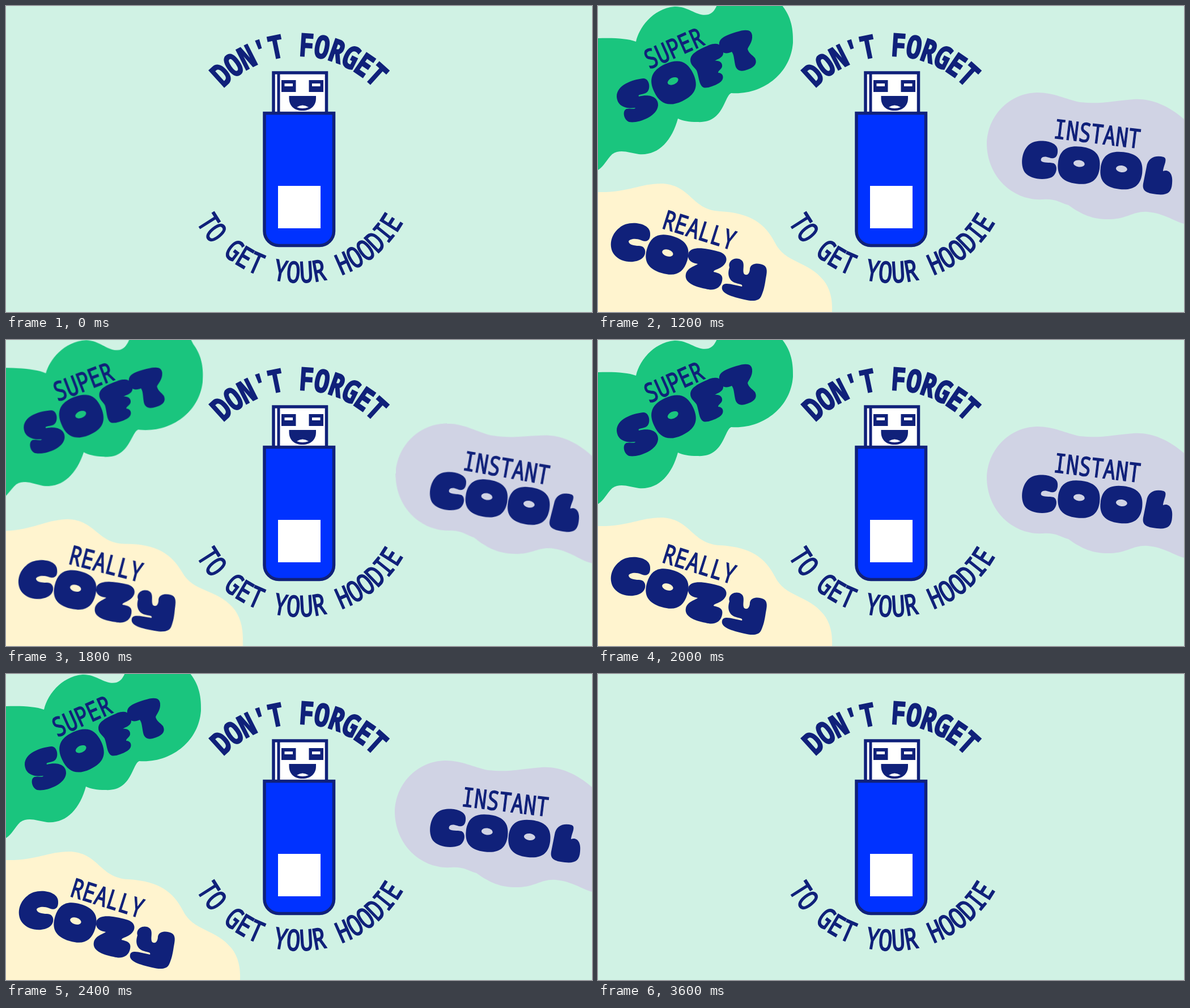
Animation, 1034 px wide and 541 px high, one loop 5.6 s. Source, as an HTML page:

```html
<!DOCTYPE html>
<html lang="en">
<head>
<meta charset="utf-8">
<title>Don't forget to get your hoodie</title>
<style>
  html, body { margin: 0; width: 100%; height: 100%; overflow: hidden; background: #d0f2e4; }
  svg { display: block; width: 100%; height: 100%; }
  text {
    font-family: "Noto Sans Mono", "DejaVu Sans Mono", monospace;
    text-anchor: middle;
    stroke: #10217a;
    vector-effect: non-scaling-stroke;
  }
  .ink, text { fill: #10217a; }
  .line { stroke: #10217a; stroke-width: 5.5; }
</style>
</head>
<body>
<svg viewBox="0 0 1034 541">
  <g id="stickers">
    <g class="sticker" data-pivot="150 125">
      <path fill="#1ac57e" d="M-60 60L0 57C25 56 52 57 67 63C72 40 95 5 135 1C160 0 175 20 195 15C203 12 207 6 210-2L240-60H290L324-2C338 15 345 35 344 65C340 120 290 158 235 154C222 160 222 208 175 205C160 205 150 203 141 199C130 240 105 265 72 262C55 260 40 252 25 262C15 272 10 284 0 290L-60 320Z"/>
      <g class="ink" role="img" aria-label="SOFT">
        <path d="M33 160C33 140 60 130 80 128C92 128 94 150 84 154C76 157 70 156 72 160C90 155 107 160 106 176C104 196 70 208 55 205C46 202 42 186 50 182C56 180 64 184 66 180C50 182 34 178 33 160Z"/>
        <path d="M163 96C163 84 176 78 196 69C214 62 222 72 221 84C220 92 210 94 206 97C214 96 220 100 219 107C218 112 212 114 212 118C222 118 224 130 214 136C204 142 192 146 186 144C178 140 178 124 174 114C170 108 163 104 163 96Z"/>
        <path d="M214 70C212 58 222 53 244 46C262 40 271 42 272 52C273 64 266 70 264 76C266 84 272 86 277 92C283 104 272 110 262 113C252 117 244 114 242 104C240 94 240 86 236 81C226 86 216 84 214 70Z"/>
      </g>
    </g>
    <g class="sticker" data-pivot="165 440">
      <path fill="#fff4cf" d="M-60 329H0C55 330 75 313 115 314C165 318 165 360 215 363C270 366 295 385 312 418C330 455 370 450 398 485C410 500 414 520 413 541L410 600H-60Z"/>
      <g class="ink" role="img" aria-label="COZY">
        <path d="M38 392C52 378 92 382 92 402C93 416 84 418 76 414C66 410 56 412 54 416C54 422 64 424 72 424C86 424 86 440 78 446C66 456 40 454 29 440C18 426 22 404 38 392Z"/>
        <path d="M160 436C166 424 190 428 212 434C228 438 230 450 222 458C214 466 204 466 204 470C212 472 222 474 219 486C216 500 204 504 190 500C168 496 152 488 155 474C158 462 172 460 176 456C164 454 156 448 160 436Z"/>
        <path d="M232 462C228 448 246 442 254 450C260 456 254 468 258 474C264 478 268 472 268 464C270 454 284 454 292 458C300 462 298 472 296 482C294 496 292 504 288 513C284 523 270 522 258 519C236 514 216 508 219 496C222 486 240 494 254 496C256 492 250 492 244 490C230 486 228 474 232 462Z"/>
      </g>
    </g>
    <g class="sticker" data-pivot="880 270">
      <path fill="#d0d3e4" d="M1100 235L1034 200C1005 175 975 163 945 165C905 168 890 174 850 170C825 165 805 153 775 153C725 154 686 195 686 246C688 305 735 345 785 342C805 340 815 347 830 352C855 370 875 378 905 377C935 376 945 362 970 364C1000 367 1015 380 1034 385L1100 400Z"/>
      <g class="ink" role="img" aria-label="COOL">
        <path d="M762 244C776 234 810 238 811 254C812 266 806 272 796 268C786 264 780 268 782 274C786 278 796 276 804 278C812 282 810 298 800 303C786 309 762 306 753 294C744 280 748 254 762 244Z"/>
        <path d="M968 284C970 268 984 263 998 267C1006 270 998 282 997 292C1008 288 1015 298 1013 314C1012 330 1004 335 986 333C966 331 960 326 962 314Z"/>
      </g>
    </g>
  </g>

  <g id="stick">
    <rect class="line" x="472" y="118" width="93.5" height="74" fill="#fff"/>
    <path class="line" d="M481 118V190" style="stroke-width:5"/>
    <path class="ink" fill-rule="evenodd" d="M486 131H511.500V152H486ZM491.500 137V142H506V137ZM534.500 131H560V152H534.500ZM540 137V142H554.500V137Z"/>
    <path class="ink" d="M499.500 159H547V163C547 177 537 185 523 185C509 185 499.500 177 499.500 163Z"/>
    <path fill="#fff" d="M513 179Q523 172 534 179Q523 183 513 179Z"/>
    <path class="line" fill="#0032ff" d="M456 189.500H578.500V398A25.500 25.500 0 0 1 553 423.500H481.500A25.500 25.500 0 0 1 456 398Z"/>
    <rect x="480" y="318" width="75" height="75" fill="#fff"/>
  </g>
</svg>
<script>
const LOOP = 5600;
const NARROW = 0.78;
const CAP = 0.714;
// The outline thickens the installed weights to the in-between ones needed here.
const HEAVY = { 'font-size': 55, 'font-weight': 700, 'stroke-width': 2.2 };
const MEDIUM = { 'font-size': 51, 'font-weight': 400, 'stroke-width': 1.8 };
const SMALL = { 'font-size': 47, 'font-weight': 400, 'stroke-width': 1.3 };
const svg = document.querySelector('svg');
const stickers = [...document.querySelectorAll('.sticker')];

function add(parent, tag, attrs, content = '') {
  const node = document.createElementNS('http://www.w3.org/2000/svg', tag);
  for (const key in attrs) node.setAttribute(key, attrs[key]);
  node.textContent = content;
  parent.append(node);
}

function lettering(parent, content, x, y, angle, style) {
  const transform = `translate(${x} ${y}) rotate(${angle}) scale(${NARROW} 1)`;
  add(parent, 'text', { transform, ...style }, content);
}

// One letter per equal angle; side is -1 for the top of the circle, 1 for the bottom.
function arc(content, cx, cy, radius, step, side, style) {
  [...content].forEach((letter, i) => {
    if (letter === ' ') return;
    const angle = (i - (content.length - 1) / 2) * step;
    const a = angle * Math.PI / 180;
    lettering(svg, letter, cx + radius * Math.sin(a), cy + side * radius * Math.cos(a),
      -side * angle, style);
  });
}

function label(parent, content, x, y, angle) {
  const a = angle * Math.PI / 180, drop = SMALL['font-size'] * CAP / 2;
  lettering(parent, content, x - drop * Math.sin(a), y + drop * Math.cos(a), angle, SMALL);
}

// Plump letter O with a small tilted counter.
function plumpO(parent, cx, cy, rx, ry, angle) {
  const k = 0.68, kx = rx * k, ky = ry * k;
  const ring = `M0 ${-ry}C${kx} ${-ry} ${rx} ${-ky} ${rx} 0S${kx} ${ry} 0 ${ry}S${-rx} ${ky} ${-rx} 0S${-kx} ${-ry} 0 ${-ry}Z`;
  add(parent, 'path', {
    class: 'ink', 'fill-rule': 'evenodd',
    transform: `translate(${cx} ${cy}) rotate(${angle})`,
    d: ring + 'M-10-3a10 6 0 1 0 20 0a10 6 0 1 0-20 0Z'
  });
}

arc("DON'T FORGET", 517, 272.6, 184.5, 7.67, -1, HEAVY);
arc('TO GET YOUR HOODIE', 518.5, 280, 209, 6.78, 1, MEDIUM);

const [soft, cozy, cool] = stickers;
label(soft, 'SUPER', 133.5, 74.5, -24);
label(cozy, 'REALLY', 179, 396, 17.5);
label(cool, 'INSTANT', 881, 226, 7);
plumpO(soft, 133.5, 135.5, 38, 36, -25);
plumpO(cozy, 122, 439.5, 37, 34, 17);
plumpO(cool, 848.5, 281.5, 37, 33, 7);
plumpO(cool, 923.5, 291, 37, 33, 7);

// Hard steps: each row is a start time and the value held from there on.
function play(node, property, rows) {
  const frames = [...rows, [LOOP, rows[rows.length - 1][1]]].map(([time, value]) =>
    ({ offset: time / LOOP, [property]: value, easing: 'step-end' }));
  node.animate(frames, { duration: LOOP, iterations: Infinity });
}

play(document.getElementById('stickers'), 'opacity',
  [[0, 0], [1000, 1 / 3], [1100, 2 / 3], [1200, 1], [3400, 2 / 3], [3500, 1 / 3], [3600, 0]]);

const tilts = [3, -3, 3];
stickers.forEach((node, i) => {
  const [x, y] = node.dataset.pivot.split(' ');
  node.style.transformOrigin = `${x}px ${y}px`;
  play(node, 'transform', [0, 1400, 1600, 1800, 2000, 2200, 2400].map((time, n) =>
    [time, `rotate(${n % 2 ? tilts[i] : 0}deg)`]));
});
</script>
</body>
</html>
```
